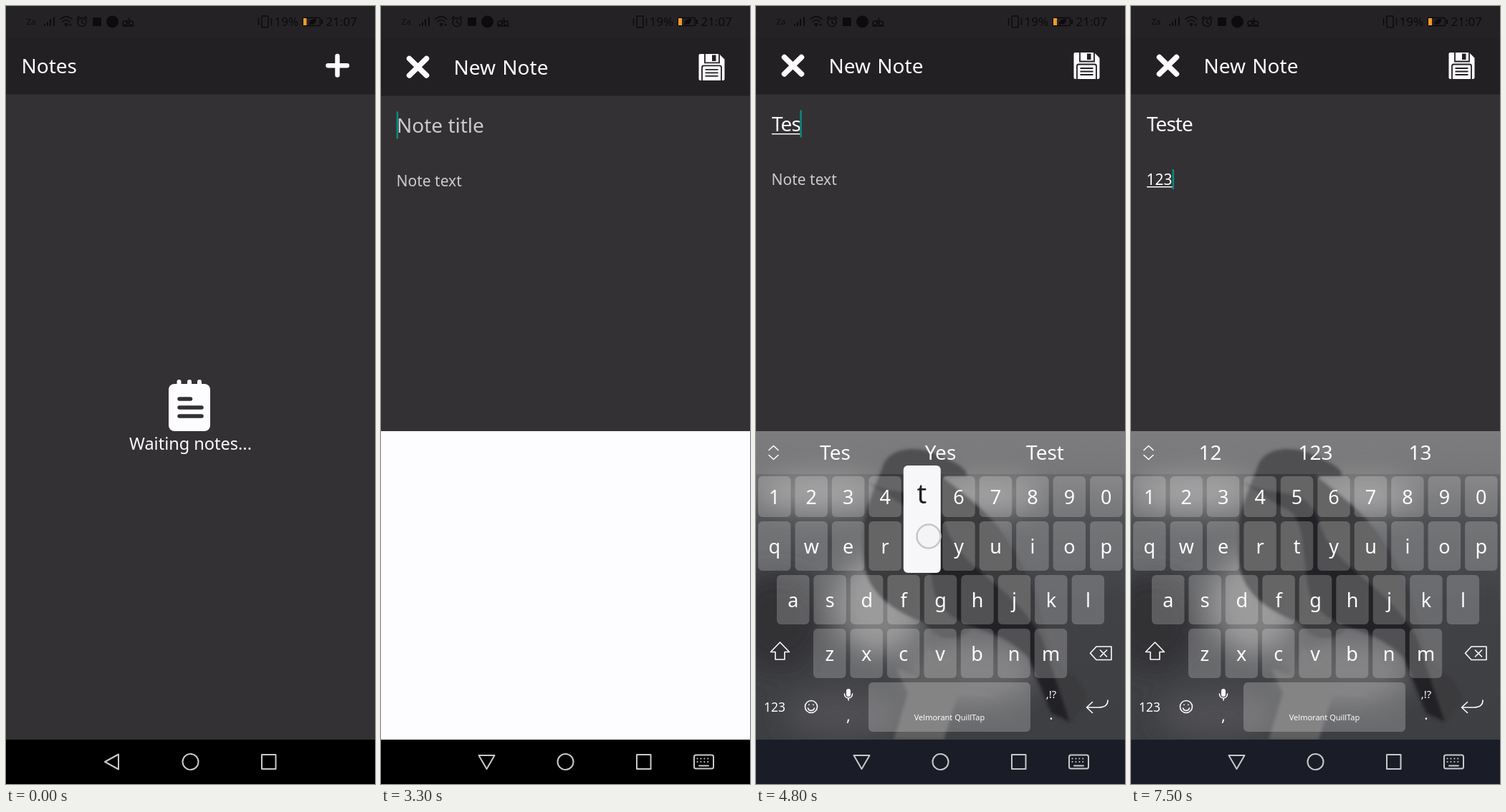
These frames come from a looping animation (515x1087 px, 8 s). An HTML page:

```html
<!DOCTYPE html>
<html lang="en">
<head>
<meta charset="utf-8">
<title>Notes</title>
<style>
html, body { margin: 0; width: 100%; height: 100%; overflow: hidden; background: #333133; }
svg { display: block; width: 515px; height: 1087px; font-family: "Noto Sans", "Open Sans", sans-serif; font-weight: 300; }
text { fill: #fdfcfe; white-space: pre; }
.mid { text-anchor: middle; }
.line { fill: none; stroke: #fdfcfe; stroke-width: 1.6; stroke-linecap: round; stroke-linejoin: round; }
.status text { fill: #0d0b0d; font-weight: 400; }
.status .line { stroke: #0d0b0d; stroke-width: 1.5; }
.status .solid { fill: #0d0b0d; }
.nav .line { stroke: #c9c8ca; stroke-width: 2; }
.head { font-size: 28px; word-spacing: 2px; }
</style>
</head>
<body>
<svg viewBox="0 0 515 1087">
  <defs>
    <linearGradient id="sky" x2="0" y2="1">
      <stop offset="0" stop-color="#6e6e70"/>
      <stop offset=".14" stop-color="#68686a"/>
      <stop offset=".3" stop-color="#4d4e51"/>
      <stop offset=".55" stop-color="#414246"/>
      <stop offset="1" stop-color="#3e3f42"/>
    </linearGradient>
    <filter id="soft" x="-50%" y="-50%" width="200%" height="200%"><feGaussianBlur stdDeviation="18"/></filter>
    <filter id="edge"><feGaussianBlur stdDeviation="2"/></filter>
    <clipPath id="board"><path d="M0 594H515V1025H0Z"/></clipPath>
  </defs>

  <!-- list page -->
  <rect width="515" height="1087" fill="#333133"/>
  <rect width="515" height="123.5" fill="#222022"/>
  <text class="head" x="21.5" y="94">Notes</text>
  <path id="plus" d="M462.5 70V96.500M449.500 83.200H476" class="line" style="stroke-width:6.500"/>
  <path fill="#fdfcfe" d="M235 528h42a8 8 0 0 1 8 8v50a8 8 0 0 1-8 8h-42a8 8 0 0 1-8-8v-50a8 8 0 0 1 8-8z"/>
  <path class="line" style="stroke-width:6" d="M241.500 525v6M256 525v6M270 525v6"/>
  <path class="line" style="stroke:#333133;stroke-width:5.500" d="M242 549h15.500M242 561h31M242 573h31"/>
  <text class="mid" x="257.5" y="619.5" font-size="23.5">Waiting notes...</text>

  <!-- editor page -->
  <g id="page">
    <rect width="515" height="1087" fill="#333133"/>
    <rect width="515" height="123.500" fill="#222022"/>
    <path class="line" style="stroke-width:7.500" d="M39.500 71.500L63.500 95M63.500 71.500L39.500 95"/>
    <text class="head" x="101.5" y="94">New Note</text>
    <path fill="#fdfcfe" d="M445 65H472L479.500 72.500V100a2 2 0 0 1-2 2H445.500a2 2 0 0 1-2-2V67a2 2 0 0 1 1.500-2z"/>
    <path fill="none" stroke="#222022" stroke-width="1.8" d="M452 65V77.500H472V65M448 102V84a2.500 2.500 0 0 1 2.500-2.500H472.500a2.500 2.500 0 0 1 2.500 2.500V102M452.500 87H470.500M452.500 91.500H470.500M452.500 96H470.500"/>
    <path fill="#222022" d="M462 66.500h5.500v8.500h-5.500z"/>
    <text id="title" x="22" y="175" font-size="28" font-weight="400"></text>
    <text id="body" x="21.500" y="250" font-size="21"></text>
    <rect id="under" x="22" height="1.500" fill="#fdfcfe"/>
    <rect id="caret" width="2.600" fill="#0d867d"/>
  </g>
  <rect id="blank" y="594" width="515" height="431" fill="#fdfcfe"/>

  <!-- keyboard -->
  <g clip-path="url(#board)">
  <g id="keyboard">
    <rect y="594" width="515" height="431" fill="url(#sky)"/>
    <g filter="url(#soft)">
      <ellipse cx="90" cy="678" rx="85" ry="26" fill="#8b8b8c"/>
      <ellipse cx="325" cy="682" rx="70" ry="24" fill="#8a8a8b"/>
      <ellipse cx="172" cy="835" rx="62" ry="70" fill="#808081"/>
      <ellipse cx="300" cy="930" rx="90" ry="45" fill="#636365"/>
      <ellipse cx="30" cy="860" rx="65" ry="70" fill="#303136"/>
      <ellipse cx="120" cy="990" rx="80" ry="34" fill="#505053"/>
    </g>
    <g filter="url(#edge)">
      <path fill="#5f5f61" d="M192 1025L212 960L196 925L228 938L240 895L258 925L290 898L278 940L338 966L282 962L262 1025Z"/>
      <path fill="#3a3a3c" d="M150 775C144 715 160 690 178 640C190 614 232 614 260 630C285 640 296 650 294 656L258 656C288 682 335 710 365 770C395 820 400 860 415 915C450 940 465 955 461 972L438 1005L412 990L384 915C362 885 335 868 300 870C280 892 250 885 236 862C190 845 155 820 150 775Z"/>
      <path fill="#232325" d="M155 665C200 690 245 665 262 720C285 790 350 800 398 880L438 1000L412 988L380 910C330 860 285 880 252 830C235 780 250 710 210 700Z"/>
    </g>
    <rect y="594" width="515" height="60" fill="#fff" opacity=".1"/>
    <g id="tips"></g>
    <g id="keys"></g>
    <rect x="157" y="945" width="226" height="69" rx="6" fill="#fff" opacity=".23"/>
    <text class="mid" x="270" y="997.500" font-size="11" font-weight="500">Velmorant QuillTap</text>
    <path class="line" d="M18 620.500L24.500 614.500L31 620.500M18 627.500L24.500 633.500L31 627.500"/>
    <path class="line" d="M33.500 889L46.500 902.500H40V913H27V902.500H20.500Z"/>
    <path id="lock" class="line" d="M24 919H43"/>
    <path class="line" d="M475 895H496V913.500H475L466.500 904.200ZM480.500 900L489.500 909M489.500 900L480.500 909"/>
    <path class="line" d="M491 970C491 977 486 980 478 980H461.500M469.500 972.500L461.500 980L469.500 987.500"/>
    <circle class="line" cx="77" cy="979" r="8.500"/>
    <path class="line" d="M72.500 981C74 985.500 80 985.500 81.500 981M74 976v.5M80 976v.5"/>
    <path class="line" d="M123.500 961C123.500 969 134.500 969 134.500 961M129 967.500V970"/>
    <rect x="126" y="954" width="6" height="11" rx="3" fill="#fdfcfe"/>
    <text class="mid" x="26" y="985.500" font-size="17.500">123</text>
    <text class="mid" x="129" y="999" font-size="22">,</text>
    <text class="mid" x="412" y="967" font-size="15">,!?</text>
    <text class="mid" x="412" y="997" font-size="20">.</text>
    <g id="pop">
      <rect width="52" rx="6" fill="#f7f7f9"/>
      <text class="mid" x="25.500" y="53" font-size="38" style="fill:#222024"></text>
    </g>
  </g>
  </g>

  <!-- system bars -->
  <g class="status">
    <rect width="515" height="45" fill="#242225"/>
    <text x="28.500" y="26" font-size="11.500">Za</text>
    <path class="line" style="stroke-width:2" d="M54 27v-1M58 27v-4M62 27v-8M67 27v-11" />
    <path class="line" d="M76 18.500Q84 11 92 18.500M79 22Q84 17 89 22M82 25.500Q84 23.500 86 25.500"/>
    <circle class="solid" cx="84" cy="27" r="1.500"/><circle class="solid" cx="90" cy="26" r="1.500"/>
    <circle class="line" cx="106" cy="22.500" r="6"/>
    <path class="line" d="M106 19v4l2.500 1.500M99 17.500l3-3M113 17.500l-3-3"/>
    <rect class="solid" x="121" y="16" width="12" height="12" rx="1"/>
    <circle class="solid" cx="148.500" cy="22" r="8.500"/>
    <g class="line"><circle cx="166" cy="24" r="3"/><circle cx="174.500" cy="24" r="3"/><path d="M163 28H178M171.500 17V24M169 20V24"/></g>
    <rect class="line" x="357" y="14" width="9" height="16" rx="1.500"/>
    <path class="line" d="M352.500 17.500v9M370.500 17.500v9"/>
    <text x="374.500" y="28" font-size="17">19%</text>
    <rect class="line" x="414.500" y="16.500" width="24" height="11" rx="1.500"/>
    <path class="solid" d="M440 19h2v6h-2zM423 26C423 20 427 18 433 18C433 24 429 27 425 25L423 27Z"/>
    <rect id="charge" x="415" y="17" height="10" fill="#f39a2b"/>
    <text x="446.500" y="28" font-size="17">21:07</text>
  </g>
  <g class="nav">
    <rect id="bar" y="1025" width="515" height="62"/>
    <path id="back" class="line"/>
    <circle class="line" cx="257.500" cy="1056" r="11"/>
    <rect class="line" x="357" y="1046" width="19.500" height="20"/>
    <g id="switch">
      <rect class="line" x="437" y="1046.500" width="27" height="19" rx="2.500"/>
      <path class="line" style="stroke-dasharray:.1 4.800" d="M441.500 1051.500H461M441.500 1056H461"/>
      <path class="line" d="M444 1061.500H457"/>
    </g>
  </g>
  <circle id="dot" r="16.500" fill="#f4f4f5" fill-opacity=".8" stroke="#c6c6ca" stroke-width="2.500"/>
</svg>
<script>
const LOOP = 8000, STEP = 100;
const $ = id => document.getElementById(id);
const set = (el, attrs) => { for (const k in attrs) el.setAttribute(k, attrs[k]); };
const show = (el, on) => el.style.visibility = on ? 'visible' : 'hidden';
const clamp = v => Math.max(0, Math.min(1, v));

function add(parent, tag, attrs) {
  const el = document.createElementNS('http://www.w3.org/2000/svg', tag);
  set(el, attrs);
  return parent.appendChild(el);
}

const keys = {};
[['1234567890', 3, 657, 57], ['qwertyuiop', 3, 720, 69], ['asdfghjkl', 29, 795, 69], ['zxcvbnm', 80, 870, 69]]
  .forEach(([row, left, y, h]) => [...row].forEach((ch, i) => {
    const x = left + i * 51.45;
    add($('keys'), 'rect', { x, y, width: 45.5, height: h, rx: 6, fill: '#fff', opacity: .21 });
    const label = add($('keys'), 'text', { x: x + 22.8, y: y + h / 2 + 10, 'font-size': 27, class: 'mid' });
    keys[ch] = { x, y, h, label };
  }));
const tips = [110.5, 257.5, 403.5].map(x => add($('tips'), 'text', { x, y: 634, class: 'mid' }));

// Each entry changes part of the state from its time on.
const script = [
  [0, { title: '', body: '', field: 'title', caret: false, caps: true, tips: 'Não|I|Eu', key: '', dot: null, plus: 1 }],
  [1300, { dot: [443, 95] }],
  [1400, { dot: [447, 99] }],
  [1500, { dot: null }],
  [2600, { plus: .3 }],
  [2700, { plus: .45 }],
  [2800, { plus: .75 }],
  [2900, { plus: 1 }],
  [3100, { caret: true }],
  [3600, { caret: false }],
  [4100, { caret: true, key: 't', dot: [238, 745] }],
  [4200, { title: 'T', caps: false, key: '', dot: null, tips: 'T|Tá|Tem' }],
  [4300, { key: 'e', dot: [134, 748] }],
  [4500, { title: 'Te', key: '', dot: null, tips: 'Te|Tem|Tenho' }],
  [4600, { key: 's', dot: [106, 824] }],
  [4700, { title: 'Tes', key: '', dot: null, tips: 'Tes|Yes|Test' }],
  [4800, { key: 't', dot: [241, 741] }],
  [4900, { title: 'Test', key: '', dot: null, tips: 'Test|Teste|Tests' }],
  [5000, { key: 'e', dot: [134, 746] }],
  [5200, { title: 'Teste', key: '', dot: null, tips: 'Testes|Teste|Teste de' }],
  [5700, { caret: false }],
  [5900, { dot: [120, 246] }],
  [6100, { dot: null, field: 'body', caret: true, caps: true, tips: 'Não|I|Eu' }],
  [6300, { dot: [39, 775] }],
  [6500, { key: '1', dot: [32, 692] }],
  [6600, { caret: false }],
  [6700, { body: '1', caret: true, caps: false, key: '', dot: null, tips: '1|10|12' }],
  [6900, { key: '2', dot: [82, 692] }],
  [7100, { body: '12', key: '', dot: null, tips: '12|123|13' }],
  [7300, { key: '3', dot: [133, 692] }],
  [7500, { body: '123', key: '', dot: null }]
];

function drawField(id, value, hint) {
  const el = $(id);
  el.textContent = value || hint;
  el.style.fill = value ? '#fdfcfe' : '#cbcacc';
  el.style.letterSpacing = value && id === 'title' ? '-1px' : '0';
}

function drawKeyboard(s) {
  for (const ch in keys) keys[ch].label.textContent = s.caps ? ch.toUpperCase() : ch;
  show($('lock'), s.caps);
  s.tips.split('|').forEach((word, i) => {
    tips[i].textContent = word;
    set(tips[i], { 'font-size': word.length > 6 ? 23 : 28 });
  });
  const key = keys[s.key], pop = $('pop');
  show(pop, key);
  if (key) {
    set(pop, { transform: `translate(${key.x - 3} ${key.y - 78})` });
    set(pop.firstElementChild, { height: key.h + 81 });
    pop.lastElementChild.textContent = key.label.textContent;
  }
}

function draw(t) {
  const s = Object.assign({}, ...script.filter(([at]) => at <= t).map(e => e[1]));
  const editing = t >= 3300, typing = t >= 3400, inTitle = s.field === 'title';

  set($('plus'), { opacity: s.plus });
  set($('charge'), { width: t < 200 ? 4.5 : 5 });
  const drop = 82 * (1 - clamp((t - 3100) / 380)) ** 5;
  set($('page'), { opacity: clamp((t - 3050) / 200), transform: `translate(0 ${drop})` });
  drawField('title', s.title, 'Note title');
  drawField('body', s.body, 'Note text');

  const value = s[s.field];
  const width = value ? $(s.field).getComputedTextLength() : 0;
  set($('under'), { y: inTitle ? 178 : 252, width });
  set($('caret'), { x: 21.5 + width, y: inTitle ? 145.5 : 228, height: inTitle ? 38 : 28 });
  show($('caret'), s.caret);

  show($('blank'), editing);
  const rise = clamp((t - 3300) / 200);
  set($('keyboard'), { opacity: rise, transform: `translate(0 ${60 * (1 - rise)})` });
  drawKeyboard(s);

  set($('bar'), { fill: typing ? '#1a1d27' : '#000' });
  set($('back'), { d: editing ? 'M136.500 1047H158.500L147.500 1066Z' : 'M138 1056L157 1045.500V1066.500Z' });
  show($('switch'), editing);
  show($('dot'), s.dot);
  if (s.dot) set($('dot'), { cx: s.dot[0], cy: s.dot[1] });
}

let start, last = -1;
function tick(now) {
  start ??= now;
  const t = Math.floor((now - start) % LOOP / STEP) * STEP;
  if (t !== last) draw(last = t);
  requestAnimationFrame(tick);
}
draw(0);
requestAnimationFrame(tick);
</script>
</body>
</html>
```
